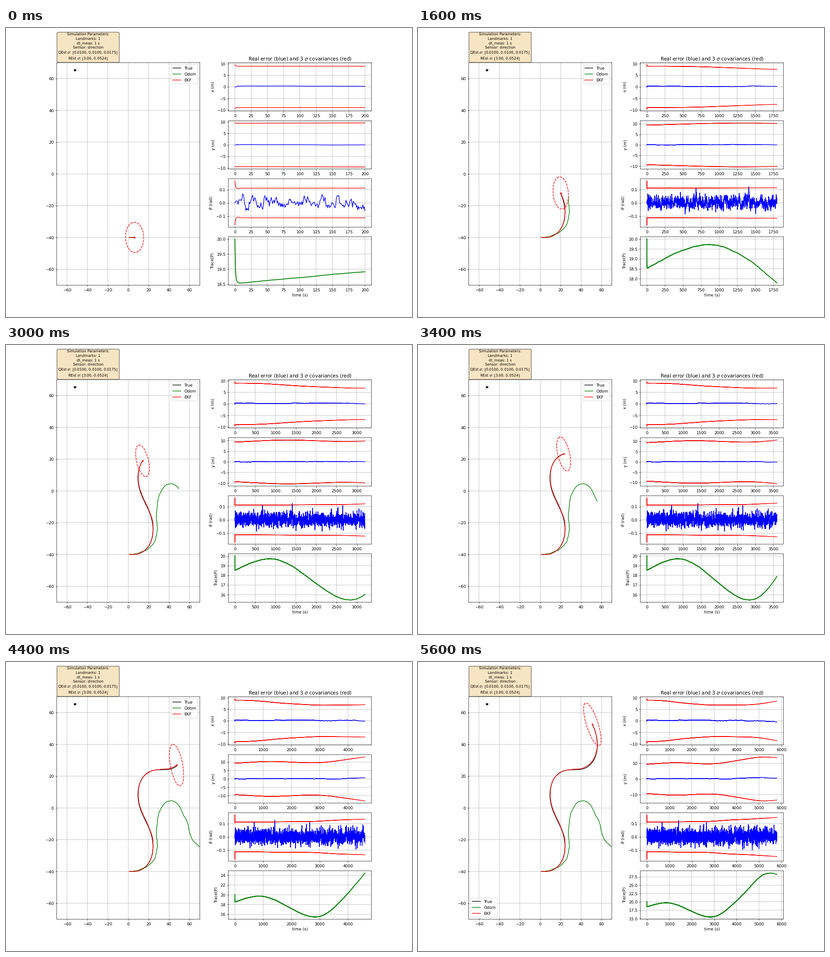
A matplotlib script for the animation above (5.8 s loop, 885 by 632 pixels).

```python
import numpy as np
import matplotlib.pyplot as plt
from matplotlib.animation import FuncAnimation

DPI = 63.2
STEPS, CHUNK, FRAMES = 6000, 200, 29
SEED = 123456
LINE, TRACE_LINE, THINNER = 1.5, 2, .4

# Small type and hairlines keep their fractional sizes and positions
plt.rcParams["text.hinting"] = "none"
plt.rcParams["path.snap"] = False


def move(pose, u):
    c, s = np.cos(pose[2]), np.sin(pose[2])
    return pose + [c * u[0] - s * u[1], s * u[0] + c * u[1], u[2]]


def bearing(pose, mark):
    return np.arctan2(mark[1] - pose[1], mark[0] - pose[0]) - pose[2]


def simulate(times, mark):
    """Robot seen by odometry and by a bearing-only EKF."""
    q_std = np.array([.01, .01, np.radians(1)])
    r_std = np.radians(3)
    Q = np.diag(q_std ** 2)
    true = odom = est = np.array([1, -40, -np.pi / 2])
    P = 10 * np.diag([1, 1, np.radians(1) ** 2])
    log = [(true, odom, est, P)]
    for k in times[1:]:
        u = np.array([0, .025, np.radians(.1) * np.sin(3 * np.pi * k / STEPS)])
        slip = q_std * np.random.RandomState(SEED * 2 + k).randn(3)
        noise = r_std * np.random.RandomState(SEED * 3 + k).randn(2)[1]
        true = move(true, u)
        odom = move(move(odom, u), slip)
        u = u + slip

        # Predict
        c, s = np.cos(est[2]), np.sin(est[2])
        A = np.array([[1, 0, -s * u[0] - c * u[1]],
                      [0, 1, c * u[0] - s * u[1]],
                      [0, 0, 1]])
        B = np.array([[c, -s, 0], [s, c, 0], [0, 0, 1]])
        est = move(est, u)
        P = A @ P @ A.T + B @ Q @ B.T

        # Correct
        dx, dy = mark - est[:2]
        d2 = dx * dx + dy * dy
        H = np.array([dy / d2, -dx / d2, -1])
        PH = P @ H
        K = PH / (H @ PH + r_std ** 2)
        est = est + K * (bearing(true, mark) + noise - bearing(est, mark))
        P = P - np.outer(K, PH)
        P = (P + P.T) / 2
        log.append((true, odom, est, P))
    return [np.array(part) for part in zip(*log)]


def ellipse(center, cov):
    val, vec = np.linalg.eig(cov)
    big = int(np.argmax(val))
    a, b = 3 * np.sqrt(val[big]), 3 * np.sqrt(val[1 - big])
    angle = np.arctan2(vec[big, 1], vec[big, 0])
    c, s = np.cos(angle), np.sin(angle)
    t = np.arange(0, 2 * np.pi + .1, .1)
    x, y = a * np.cos(t), b * np.sin(t)
    return center[0] + c * x + s * y, center[1] - s * x + c * y


times = np.arange(CHUNK * FRAMES + 1)
mark = 140 * (np.random.RandomState(SEED).rand(2) - .5)
true, odom, est, cov = simulate(times, mark)
error = est - true
sigma3 = 3 * np.sqrt(np.diagonal(cov, axis1=1, axis2=2))
trace = np.trace(cov, axis1=1, axis2=2)

# A hair over the pixel size so that rounding never drops a pixel
fig = plt.figure(figsize=(885.001 / DPI, 632.001 / DPI), dpi=DPI)
grid = fig.add_gridspec(4, 2)
world = fig.add_subplot(grid[:, 0])
panels = [fig.add_subplot(grid[i, 1]) for i in range(4)]

fig.text(179 / 885, 1 - 41.5 / 632,
         "Simulation Parameters:\nLandmarks: 1\ndt_meas: 1 s\n"
         "Sensor: direction\n"
         "QEst $\\sigma$: [0.0100, 0.0100, 0.0175]\n"
         "REst $\\sigma$: [3.00, 0.0524]",
         fontsize=9, ha="center", va="center", multialignment="center",
         linespacing=1.27,
         bbox=dict(boxstyle="round,pad=0.3", facecolor="wheat", alpha=.8))

panels[0].set_title("Real error (blue) and 3 $\\sigma$ covariances (red)")
panels[3].set_xlabel("time (s)")
for ax, name in zip(panels, ("x (m)", "y (m)", "$\\theta$ (rad)", "Trace(P)")):
    ax.set_ylabel(name)
    ax.grid(True)

# Each refresh plots the whole history again on top of the earlier ones
layers = []
for i in range(FRAMES):
    n = CHUNK * (i + 1) + 1
    t = times[:n]
    layer = []
    for j, ax in enumerate(panels[:3]):
        layer += ax.plot(t, error[:n, j], "b")
        layer += ax.plot(t, sigma3[:n, j], "r")
        layer += ax.plot(t, -sigma3[:n, j], "r")
    layer += panels[3].plot(t, trace[:n], "g")
    layers.append(layer)


def update(i):
    # Older passes are thinner, so that the pile does not grow too bold
    for j, layer in enumerate(layers):
        for line in layer:
            full = TRACE_LINE if line.axes is panels[3] else LINE
            line.set_linewidth(full if j == i else full - THINNER)
            line.set_visible(j <= i)
    for ax in panels:
        ax.relim(visible_only=True)
        ax.autoscale_view()

    k = CHUNK * (i + 1)
    world.clear()
    world.plot(*mark, "*k")
    for path, style, name in ((true, "-k", "True"), (odom, "-g", "Odom"),
                              (est, "-r", "EKF")):
        world.plot(path[:k + 1, 0], path[:k + 1, 1], style, label=name)
    world.plot(est[k, 0], est[k, 1], ".r")
    world.plot(*ellipse(est[k], cov[k, :2, :2]), "--r")
    world.axis([-70, 70, -70, 70])
    world.grid(True)
    world.legend()
    return []


anim = FuncAnimation(fig, update, frames=FRAMES, interval=200,
                     init_func=lambda: [], repeat=True, repeat_delay=0)
plt.show()
```
